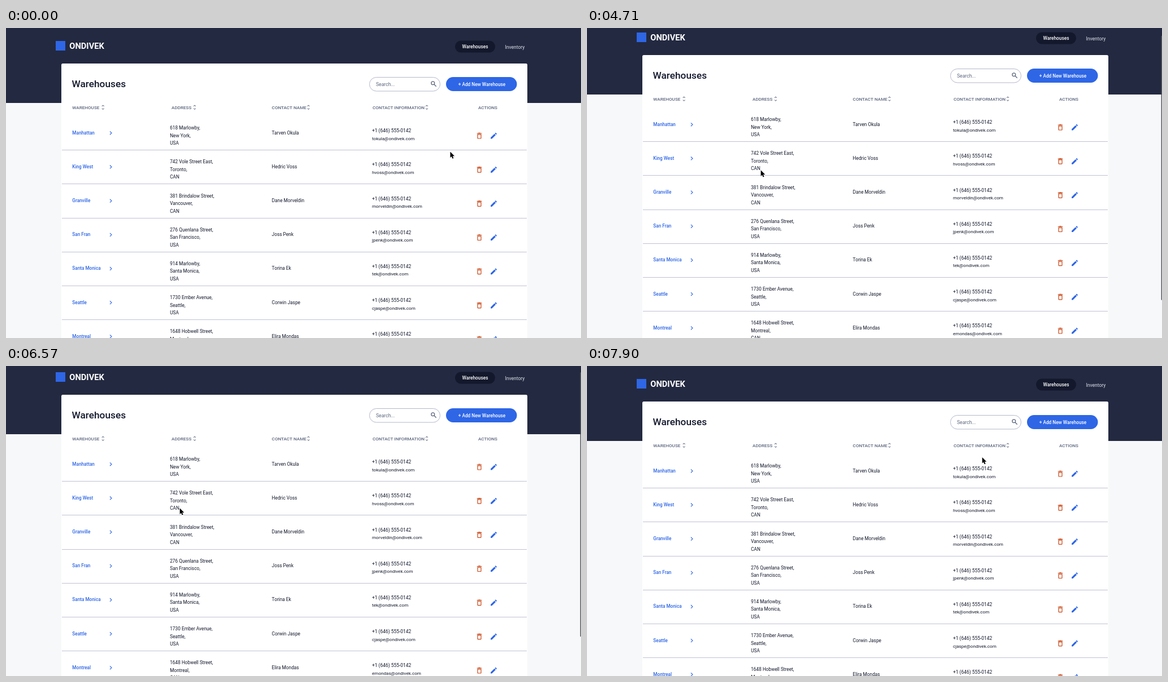
These frames come from a looping animation (1018x550 px, 8 s). An HTML page with a canvas:

```html
<!DOCTYPE html>
<html lang="en">
<head>
<meta charset="utf-8">
<title>Warehouses</title>
<style>
  html, body { margin: 0; width: 100%; height: 100%; overflow: hidden; background: #f7f8f9; }
  canvas { display: block; width: 1018px; height: 550px; }
</style>
</head>
<body>
<canvas id="stage"></canvas>
<script>
const W = 1018, H = 550, LOOP = 8000;
const NAVY = '#232940', INK = '#13182c', BLUE = '#2e66e6', SLATE = '#5c667e', RED = '#c94515', RULE = '#bfc1d4';
const PHONE = '+1 (646) 555-0142', DOMAIN = '@ondivek.com';
const ROW = 60.17;

const rows = [
  ['Manhattan', '618 Marlowby,', 'New York,', 'USA', 'Tarven Okula', 'tokula'],
  ['King West', '742 Vole Street East,', 'Toronto,', 'CAN', 'Hedric Voss', 'hvoss'],
  ['Granville', '381 Brindalow Street,', 'Vancouver,', 'CAN', 'Dane Morveldin', 'morveldin'],
  ['San Fran', '276 Quenlana Street,', 'San Francisco,', 'USA', 'Joss Penk', 'jpenk'],
  ['Santa Monica', '914 Marlowby,', 'Santa Monica,', 'USA', 'Torina Ek', 'tek'],
  ['Seattle', '1730 Ember Avenue,', 'Seattle,', 'USA', 'Corwin Jaspe', 'cjaspe'],
  ['Montreal', '1648 Hobwell Street,', 'Montreal,', 'CAN', 'Elira Mondas', 'emondas']
];

const headings = [
  ['WAREHOUSE', 117.3, 171.7], ['ADDRESS', 293, 334], ['CONTACT NAME', 470.6, 535.5],
  ['CONTACT INFORMATION', 649, 745], ['ACTIONS', 836, 0]
];

// [time, scroll offset]
const scrolls = [
  [0, 0], [4710, 15], [4880, 26], [5060, 32], [5260, 35], [5710, 37], [5880, 40], [6060, 41],
  [6360, 29], [6560, 12], [6790, 3], [7010, -1], [7190, -2], [7370, -1], [7550, 0]
];

// [time, x, y, pointing hand]
const moves = [
  [0, 786.5, 219.5], [300, 620, 262], [470, 429, 278], [770, 242, 210], [1070, 204, 195],
  [1220, 183.5, 187, 1], [1670, 186, 183, 1], [1820, 186.5, 181.5, 1],
  [2570, 185.5, 182, 1], [2720, 184, 183, 1], [2870, 182.5, 184, 1], [3010, 184, 183, 1], [3160, 183.2, 184, 1],
  [3650, 215, 205], [3800, 282, 242], [3940, 307.7, 252.3],
  [7550, 360, 240], [7725, 570, 192], [7900, 699.7, 162]
];

const icons = {
  trash: new Path2D('M6 19c0 1.1.9 2 2 2h8c1.1 0 2-.9 2-2V7H6v12zM8 9h8v10H8V9zm7.5-5l-1-1h-5l-1 1H5v2h14V4z'),
  pencil: new Path2D('M3 17.25V21h3.75L17.81 9.94l-3.75-3.75L3 17.25zM20.71 7.04c.39-.39.39-1.02 0-1.41l-2.34-2.34c-.39-.39-1.02-.39-1.41 0l-1.83 1.83 3.75 3.75 1.83-1.83z'),
  chevron: new Path2D('M10 6L8.59 7.41 13.17 12l-4.58 4.59L10 18l6-6z'),
  sort: new Path2D('M12 5.83L15.17 9l1.41-1.41L12 3 7.41 7.59 8.83 9 12 5.83zM12 18.17L8.83 15l-1.41 1.41L12 21l4.59-4.59L15.17 15z')
};
const arrow = new Path2D('M0 0V10.6L2.4 8.4L4 12.2L5.9 11.4L4.3 7.7H7.6Z');
const hand = new Path2D('M3.3 8V1.7Q3.3.6 4.2.6T5.1 1.7V5.2Q6.6 4.4 7 5.6Q8.4 4.9 8.8 6.1Q10.4 5.6 10.4 7.3V9.5Q10.2 11.2 9.4 12V13.4H4V12.2Q2.8 11 1.6 9Q.2 7.3 1 6.9Q2 6.5 3.3 8Z');

const canvas = document.getElementById('stage');
const dpr = window.devicePixelRatio || 1;
canvas.width = W * dpr;
canvas.height = H * dpr;
const c = canvas.getContext('2d');

function text(str, x, y, color = INK, size = 8.3, weight = 400, align = 'left') {
  c.font = `${weight} ${size}px Roboto, "Open Sans", sans-serif`;
  c.textAlign = align;
  c.fillStyle = color;
  c.fillText(str, x, y);
}

function box(x, y, w, h, r, fill, stroke) {
  c.beginPath();
  c.roundRect(x, y, w, h, r);
  if (fill) { c.fillStyle = fill; c.fill(); }
  if (stroke) { c.strokeStyle = stroke; c.lineWidth = 1; c.stroke(); }
}

function icon(name, x, y, scale, color) {
  c.save();
  c.translate(x, y);
  c.scale(scale, scale);
  c.translate(-12, -12);
  c.fillStyle = color;
  c.fill(icons[name], 'evenodd');
  c.restore();
}

function drawHeader() {
  c.fillStyle = NAVY;
  c.fillRect(0, 0, W, 133);
  c.fillStyle = BLUE;
  c.fillRect(88, 23, 17, 17);
  text('ONDIVEK', 112.3, 37.3, '#fff', 14.7, 700);
  box(795, 22.5, 71, 21, 10.5, INK);
  text('Warehouses', 830.5, 36, '#fff', 8.3, 500, 'center');
  text('Inventory', 883.5, 36.8, '#dfe2ea', 8.5);
}

function drawToolbar() {
  text('Warehouses', 116.5, 105.2, INK, 17.3, 500);
  box(643.5, 87.5, 125, 24.5, 12.25, '#fff', '#b3b7cb');
  text('Search...', 655, 103.3, SLATE, 8.6);
  c.strokeStyle = SLATE;
  c.lineWidth = 1.3;
  c.beginPath();
  c.arc(755.8, 97.8, 2.9, 0, Math.PI * 2);
  c.moveTo(758, 100);
  c.lineTo(761.7, 103.7);
  c.stroke();
  box(779, 87, 125.5, 25, 12.5, BLUE);
  text('+ Add New Warehouse', 842.5, 103, '#fff', 8.25, 500, 'center');
  for (const [label, x, sortX] of headings) {
    text(label, x, 143.6, SLATE, 8.1, 500);
    if (sortX) icon('sort', sortX, 140.7, 0.48, SLATE);
  }
}

function drawRow([name, street, city, country, contact, user], i) {
  const y = 188.8 + i * ROW;
  text(name, 117.3, y, BLUE, 8.2, 500);
  icon('chevron', 185.5, y - 2.5, 0.56, BLUE);
  [street, city, country].forEach((line, n) => text(line, 290.2, y - 8.6 + n * 13.5));
  text(contact, 470.6, y);
  text(PHONE, 648, y - 3.6, INK, 8.45);
  text(user + DOMAIN, 648, y + 9.9, INK, 8.1);
  icon('trash', 838, y + 2.4, 0.6, RED);
  icon('pencil', 863.5, y + 2.4, 0.6, BLUE);
  c.fillStyle = RULE;
  c.fillRect(99, Math.round(y + 27.5), 823, 1);
}

function drawScrollbar(scroll) {
  const top = Math.max(0, 1 + scroll * 0.85);
  box(1016.6, top, 3, 470 + scroll * 0.85 - top, 1, '#55575e');
}

function drawCursor(x, y, pointing) {
  const shape = pointing ? hand : arrow;
  c.save();
  c.translate(x, y);
  c.lineJoin = 'round';
  c.lineWidth = pointing ? 1 : 1.6;
  c.strokeStyle = pointing ? '#000' : '#fff';
  c.fillStyle = pointing ? '#fff' : '#000';
  if (pointing) c.fill(shape);
  c.stroke(shape);
  if (!pointing) c.fill(shape);
  if (pointing) {
    c.lineWidth = 0.6;
    c.beginPath();
    for (const fx of [5.1, 6.8, 8.5]) {
      c.moveTo(fx, 9);
      c.lineTo(fx, 11.6);
    }
    c.stroke();
  }
  c.restore();
}

const at = (keys, t) => keys.findLast(k => k[0] <= t);

function draw(t) {
  const scroll = at(scrolls, t)[1];
  const [, x, y, pointing] = at(moves, t);
  c.setTransform(dpr, 0, 0, dpr, 0, 0);
  c.fillStyle = '#f7f8f9';
  c.fillRect(0, 0, W, H);
  c.save();
  c.translate(0, -scroll);
  drawHeader();
  box(98, 63, 825, 600, 2.5, '#fff');
  drawToolbar();
  rows.forEach(drawRow);
  c.restore();
  if (t >= 4710 && t < 7725) drawScrollbar(scroll);
  drawCursor(x, y, pointing);
}

const start = performance.now();
function tick() {
  draw((performance.now() - start) % LOOP);
  requestAnimationFrame(tick);
}
tick();
</script>
</body>
</html>
```
